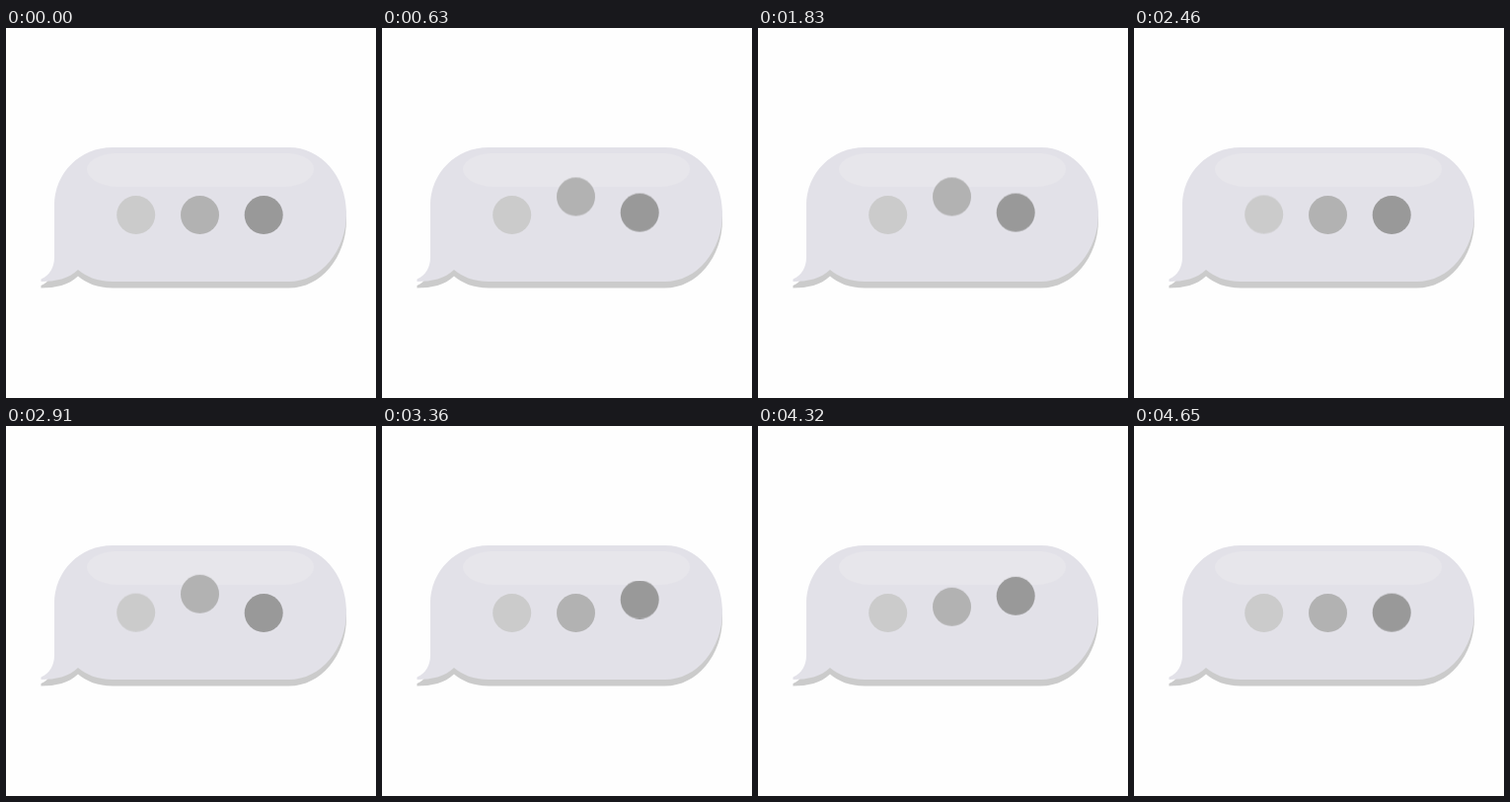
An HTML page without scripts for the animation above (4.8 s loop, 375 by 375 pixels).

```html
<!DOCTYPE html>
<html lang="en">
<head>
<meta charset="utf-8">
<title>Typing bubble</title>
<style>
html, body {
  margin: 0;
  width: 100%;
  height: 100%;
  overflow: hidden;
  background: #fefefe;
}
svg {
  display: block;
  width: 100%;
  height: 100%;
}
.dot {
  animation: hop 1200ms infinite;
}
.two { animation-delay: 270ms; }
.three { animation-delay: 540ms; }

@keyframes hop {
  0%, 2.5% {
    transform: translateY(0);
    animation-timing-function: cubic-bezier(.55, 0, .2, 1);
  }
  22.5% {
    transform: translateY(-19.4px);
    animation-timing-function: linear;
  }
  25% {
    transform: translateY(-19.4px);
    animation-timing-function: cubic-bezier(.8, 0, .4, 1);
  }
  45%, 100% {
    transform: translateY(0);
  }
}
</style>
</head>
<body>
<svg viewBox="0 0 375 375">
  <defs>
    <path id="bubble" d="M108 121H287C319 121 345 150 345 188S319 257 287 257H108C93 257 81 252 73 245C64 254 50 257 35.5 257V254.5C44 251 49 243 49 232V180C49 147 75 121 108 121Z"/>
  </defs>
  <use href="#bubble" y="6.5" fill="#cbcbcb"/>
  <use href="#bubble" fill="#e2e1e8"/>
  <path fill="#e7e6eb" d="M112 127H284C300 127 312 134 312 143C312 153 298 161 280 161H115C97 161 82 153 82 143C82 134 96 127 112 127Z"/>
  <circle class="dot" cx="131.7" cy="189.5" r="19.5" fill="#cbcbcb"/>
  <circle class="dot two" cx="196.5" cy="189.5" r="19.5" fill="#b2b2b2"/>
  <circle class="dot three" cx="261.2" cy="189.5" r="19.5" fill="#999"/>
</svg>
</body>
</html>
```
